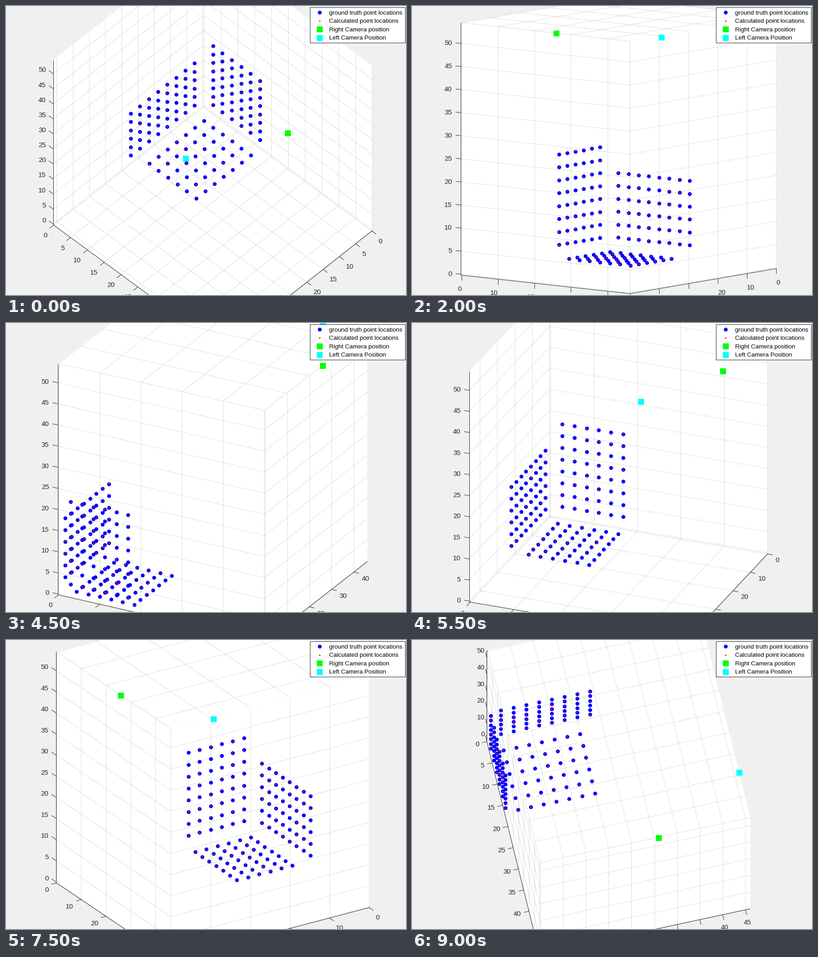
Write a matplotlib script that moves like this. It is 879x637 px and loops after 10 s.

```python
import itertools

import matplotlib.pyplot as plt
import numpy as np
from matplotlib.animation import FuncAnimation
from matplotlib.collections import LineCollection
from matplotlib.patches import Polygon, Rectangle

W, H, DPI = 879, 637, 64
PT = 72 / DPI                      # points per pixel
INK = (0.15, 0.15, 0.15)
GRID = (0.15, 0.15, 0.15, 0.15)
SCALE = 10.27
CENTRE = np.array([454.5, 307.3])
LIM = np.array([[-0.2, 46.1], [-0.2, 50.1], [-0.2, 54.5]])
MID = np.array([23.0, 25.0, 27.2])
RIGHT_CAM = (25.96, 50.1, 54.5)
LEFT_CAM = (46.1, 39.25, 54.2)

# azimuth and elevation of the turning view, one pair per half second
VIEWS = [(134, 49.8), (181, 48), (227.7, 42), (274, 20), (321.3, -7.9),
         (329, -12), (325, -45), (349.7, -90), (389, -50), (421.6, -25),
         (481, 20), (471.75, 25.2), (523, 33), (574.1, 39.6), (618, 10),
         (662, -25), (700.1, -39.5), (716.5, -55), (733, -69.1)]

STEP = 2.8
POINTS = STEP * np.array(
    [(x, y, 0) for x in range(1, 8) for y in range(1, 7)]
    + [(x, 0, z) for x in range(1, 9) for z in range(1, 7)]
    + [(0, y, z) for y in range(1, 7) for z in range(1, 9)], float)

rng = np.random.default_rng(7)
ERROR = rng.normal(0, 0.03, POINTS.shape)
ERROR[np.all(POINTS == (0, STEP, STEP), axis=1)] = (-0.05, 0.0, 0.38)

plt.rcParams["font.family"] = "Liberation Sans"
fig = plt.figure(figsize=(W / DPI, H / DPI), dpi=DPI, facecolor="#f0f0f0")
ax = fig.add_axes([0, 0, 1, 1])
ax.set_xlim(0, W)
ax.set_ylim(H, 0)
ax.axis("off")
moving = []


def keep(artist):
    moving.append(artist)


def dots(xy, marker, size, color, z):
    xy = np.atleast_2d(xy)
    return ax.plot(xy[:, 0], xy[:, 1], marker, ms=size * PT, color=color,
                   mew=0, zorder=z)[0]


def label(x, y, text, ha):
    keep(ax.text(x, y, text, ha=ha, va="center", color=INK,
                 fontsize=15 * PT, zorder=3))


def lines(segments, color, z):
    keep(ax.add_collection(LineCollection(segments, colors=[color],
                                          linewidths=PT, zorder=z)))


def legend():
    ax.add_patch(Rectangle((668, 3), 208.5, 78, fc="white", ec=INK, lw=PT,
                           zorder=20))
    rows = [("ground truth point locations", "o", 8.5, "#0000ff"),
            ("Calculated point locations", "o", 3, "#ff0000"),
            ("Right Camera position", "s", 13, "#00ff00"),
            ("Left Camera Position", "s", 13, "#00ffff")]
    for i, (text, marker, size, color) in enumerate(rows):
        y = 14.2 + 18.5 * i
        dots((689, y), marker, size, color, 21)
        ax.text(710, y + 4.7, text, fontsize=13.43 * PT, color="black",
                va="baseline", zorder=21)


def camera(az, el):
    """Screen basis (3x2, y down) and the direction towards the viewer."""
    a, e = np.radians([az, el])
    sa, ca, se, ce = np.sin(a), np.cos(a), np.sin(e), np.cos(e)
    basis = SCALE * np.array([[ca, se * sa], [sa, -se * ca], [0, -ce]])
    return basis, np.array([sa * ce, -ca * ce, se])


def tick_values(axis, basis, el):
    length = np.hypot(*basis[axis]) * 5
    if axis == 2:
        step = 5 if length > 20 else 10
    else:
        step = 5 if length > 49 or abs(el) > 45 else 10
    return np.arange(0, LIM[axis, 1] + 1e-6, step)


def draw(i):
    while moving:
        moving.pop().remove()
    az, el = VIEWS[min(i, len(VIEWS) - 1)]
    basis, eye = camera(az, el)

    def project(p):
        return CENTRE + (np.asarray(p, float) - MID) @ basis

    def spot(axis, value, base):
        p = np.array(base, float)
        p[axis] = value
        return p

    ticks = [tick_values(k, basis, el) for k in range(3)]
    back = np.where(eye > 0, LIM[:, 0], LIM[:, 1])

    # white back planes with their grid lines
    grid = []
    for k in range(3):
        u, v = [m for m in range(3) if m != k]
        corners = [spot(u, LIM[u, a], spot(v, LIM[v, b], back))
                   for a, b in ((0, 0), (0, 1), (1, 1), (1, 0))]
        keep(ax.add_patch(Polygon(project(corners), fc="white", lw=0,
                                  zorder=0)))
        for m, n in ((u, v), (v, u)):
            if np.hypot(*basis[m]) < 0.5:
                continue
            for t in ticks[m]:
                line = spot(m, t, back)
                grid.append(project([spot(n, LIM[n, 0], line),
                                     spot(n, LIM[n, 1], line)]))
    lines(grid, GRID, 1)

    # the labelled edges meet at the lowest floor corner
    floor = [np.array([x, y, LIM[2, 0]])
             for x, y in itertools.product(LIM[0], LIM[1])]
    low = max(floor, key=lambda p: project(p)[1])
    left = min(floor, key=lambda p: project(p)[0])
    left_axis = 0 if left[1] == low[1] else 1
    dark = []

    def outward(axis, corner):
        sign = 1 if corner[axis] == LIM[axis, 1] else -1
        d = sign * basis[axis]
        return d / max(np.hypot(*d), 1e-9)

    for k in (0, 1):
        dark.append(project([spot(k, LIM[k, 0], low),
                             spot(k, LIM[k, 1], low)]))
        flat = abs(el) < 15
        d = np.array([0.0, 1.0]) if flat else outward(1 - k, low)
        steep = abs(el) > 60
        if steep and abs(d[0]) < 0.3:
            ha = "center"
        else:
            ha = "right" if k == left_axis else "left"
        drop = 17.5 * d[1] if steep else 10.5 + 9 * d[1]
        for t in ticks[k]:
            base = project(spot(k, t, low))
            end = base + 11.5 * d
            dark.append([base, end])
            label(end[0] + 6 * d[0], end[1] + drop, f"{t:.0f}", ha)

    if np.hypot(*basis[2]) > 0.5:
        dark.append(project([left, spot(2, LIM[2, 1], left)]))
        d = outward(left_axis, left)
        for t in ticks[2]:
            base = project(spot(2, t, left))
            end = base + 11.5 * d
            dark.append([base, end])
            label(end[0] + 8 * d[0], end[1] + 4.5 * d[1] + 1.7,
                  f"{t:.0f}", "right")
    lines(dark, INK, 2)

    # dots, with the estimates that lie nearer to the viewer on top
    keep(dots(project(POINTS), "o", 8.5, "#0000ff", 6))
    near = (ERROR @ eye > 0) | (ERROR[:, 2] > 0.3)
    keep(dots(project(POINTS + ERROR)[near], "o", 3, "#ff0000", 7))
    depth = POINTS.mean(axis=0) @ eye
    for pos, color in ((RIGHT_CAM, "#00ff00"), (LEFT_CAM, "#00ffff")):
        z = 8 if np.dot(pos, eye) > depth else 5
        keep(dots(project(pos), "s", 13, color, z))
    return moving


legend()
anim = FuncAnimation(fig, draw, frames=20, interval=500, repeat=True,
                     repeat_delay=0, blit=False, init_func=lambda: draw(0))
plt.show()
```
